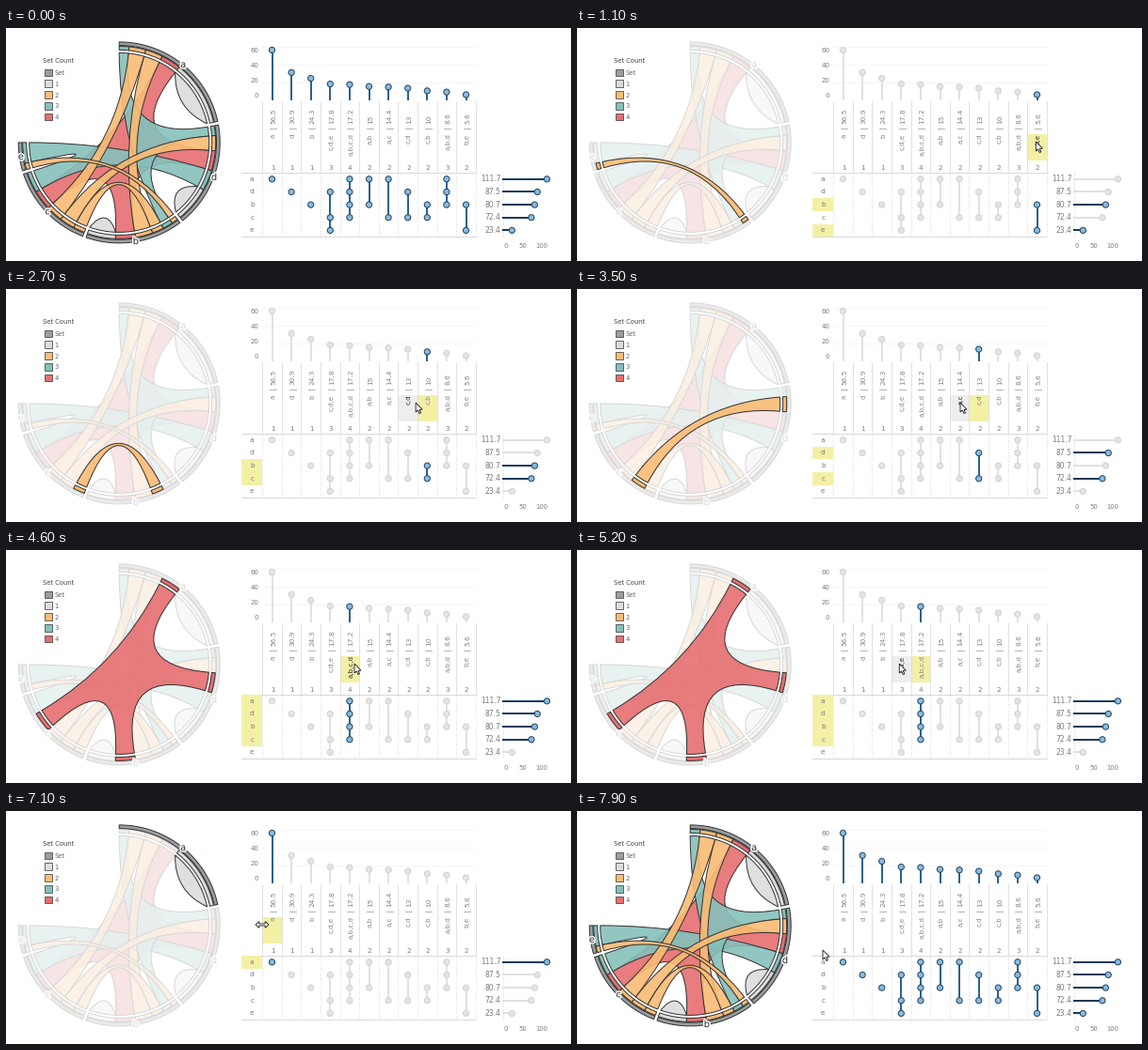
Animation, 600 px wide and 248 px high, one loop 8 s. Source, as a matplotlib script:

```python
import numpy as np
import matplotlib.pyplot as plt
import matplotlib.patheffects as fx
from matplotlib.animation import FuncAnimation
from matplotlib.colors import to_rgb
from matplotlib.patches import Circle, PathPatch, Polygon, Rectangle
from matplotlib.path import Path

W, H, DPI = 600, 248, 100
STEP, FRAMES = 100, 80
PX = 72 / DPI
LAG = 300  # delay between hovering a header and its highlight

COMBOS = {"a": 56.5, "d": 30.9, "b": 24.3, "cde": 17.8, "abcd": 17.2,
          "ab": 15, "ac": 14.4, "cd": 13, "cb": 10, "abd": 8.6, "be": 5.6}
KEYS = list(COMBOS)
SETS = "adbce"
TOTAL = {s: sum(v for k, v in COMBOS.items() if s in k) for s in SETS}

COUNT_COLOR = {1: "#dcdcdc", 2: "#fabc74", 3: "#86c0bb", 4: "#e66e70"}
SET_GRAY, INK = "#9a9da1", "#333333"
BLUE, NAVY, DOT, DOT_EDGE = "#2d628f", "#1d3a59", "#88bbdf", "#24435f"
YELLOW, HOVER = "#f3f0a6", "#eeeeee"
TEXT, HEAD, DARK = "#7a7a7a", "#858585", "#2a2a2a"

# Upset chart layout
X0, COL, ROW0, ROW = 272.2, 20.6, 160.8, 13.65
X1 = X0 + COL * len(KEYS)
LEFT, HEAD_Y, HEAD_H = 250.3, 112.7, 28
BASE, UNIT = 76.2, 0.933
BAR_X, BAR_UNIT = 527.5, 0.42

# Chord layout, angles clockwise from the top
CX, CY, GAP = 120.2, 121.9, 2.0
R_CHORD, R_COUNT, R_SET = 95.5, (98.5, 102.5), (103.3, 107.0)
DEG = (270 - GAP * 4) / sum(TOTAL.values())

fig = plt.figure(figsize=(W / DPI, H / DPI), dpi=DPI, facecolor="white")
ax = fig.add_axes([0, 0, 1, 1])
ax.set(xlim=(0, W), ylim=(H, 0))
ax.axis("off")

items = []  # (artist, test, style when on, style when off, base zorder)


def track(artist, test, on, off, z):
    items.append((artist, test, on, off, z))


def only(key):
    return lambda active: active == key


def member(letter):
    return lambda active: letter in active


def label(x, y, s, size, color=TEXT, ha="center", va="center", **kw):
    return ax.text(x, y, s, fontsize=size * PX, color=color, ha=ha, va=va,
                   family="DejaVu Sans", **kw)


def line(xs, ys, color="#d6d6d6", width=0.8, z=1, **kw):
    return ax.plot(xs, ys, color=color, lw=width * PX, zorder=z, **kw)[0]


def polar(r, deg):
    t = np.radians(deg)
    return np.column_stack([CX + r * np.sin(t), CY - r * np.cos(t)])


def arc(r, a, b):
    return polar(r, np.linspace(a, b, max(4, int(abs(b - a)) + 2)))


def faded(color):
    """Slightly greyed tint of a colour."""
    rgb = np.array(to_rgb(color))
    rgb = 0.8 * rgb + 0.2 * rgb.mean()
    return 1 - 0.23 * (1 - rgb)


def shape(patch, test, color, z, alpha=1.0):
    patch.set(linewidth=PX, joinstyle="round")
    ax.add_patch(patch)
    track(patch, test,
          dict(facecolor=(*to_rgb(color), alpha), edgecolor=INK),
          dict(facecolor=(*faded(color), 0.85), edgecolor="#d8d8d8"), z)


def band(radii, a, b, test, color):
    pts = np.vstack([arc(radii[0], a, b), arc(radii[1], b, a)])
    shape(Polygon(pts, closed=True), test, color, 7)


def ribbon(spans):
    """Join arcs of the inner circle by curves bent towards the centre."""
    verts, codes = [], []
    ctrl = (CX, CY)
    if len(spans) == 1:
        ctrl = tuple(polar(R_CHORD * 0.72, [np.mean(spans[0])])[0])
    for i, (a, b) in enumerate(spans):
        pts = arc(R_CHORD, a, b)
        verts += [tuple(p) for p in pts]
        codes += [Path.LINETO] * len(pts)
        nxt = spans[(i + 1) % len(spans)][0]
        verts += [ctrl, tuple(polar(R_CHORD, [nxt])[0])]
        codes += [Path.CURVE3] * 2
    codes[0] = Path.MOVETO
    return Path(verts, codes)


def draw_chords():
    spans = {k: [] for k in KEYS}
    start = 0
    halo = [fx.withStroke(linewidth=3 * PX, foreground="white")]
    for s in SETS:
        end = start + TOTAL[s] * DEG
        band(R_SET, start, end, only(s), SET_GRAY)
        at = start
        for k in sorted((k for k in KEYS if s in k), key=COMBOS.get):
            stop = at + COMBOS[k] * DEG
            spans[k].append((at, stop))
            band(R_COUNT, at, stop, only(k), COUNT_COLOR[len(k)])
            at = stop
        x, y = polar(106.5, [(start + end) / 2])[0]
        t = label(x + 1, y, s, 10, path_effects=halo)
        track(t, only(s), dict(color=DARK), dict(color="#d8d8d8"), 20)
        start = end + GAP
    for k in KEYS:
        n = len(k)
        shape(PathPatch(ribbon(spans[k])), only(k), COUNT_COLOR[n], 6 - n, 0.9)


def draw_legend():
    label(39, 35, "Set Count", 6.8, "#444444", "left")
    rows = [("Set", SET_GRAY)] + [(str(n), c) for n, c in COUNT_COLOR.items()]
    for i, (name, color) in enumerate(rows):
        y = 47.4 + 11.8 * i
        ax.add_patch(Rectangle((41, y - 3.8), 7.6, 7.6, fc=color, ec="#444444",
                               lw=0.8 * PX))
        label(51.5, y, name, 6.8, "#666666", "left", "center_baseline")


def stem(xs, ys, test, color, z=4):
    ln = line(xs, ys, color, 2)
    track(ln, test, dict(color=color), dict(color="#dfe1e3"), z)


def dot(x, y, test):
    c = ax.add_patch(Circle((x, y), 3.1, lw=PX))
    track(c, test, dict(facecolor=DOT, edgecolor=DOT_EDGE),
          dict(facecolor="#e4e4e4", edgecolor="#d2d2d2"), 5)


def row_y(s):
    return ROW0 + ROW * SETS.index(s)


def draw_grid():
    top, bottom = ROW0 - ROW / 2, ROW0 + ROW * 4.5
    for y in (top, bottom):
        line([LEFT, X1], [y, y], "#d0d0d0")
    for v in (20, 40, 60):
        y = BASE - UNIT * v
        line([X0, X1], [y, y], "#f4f4f4")
    for i in range(len(KEYS) + 1):
        x = X0 + COL * i
        line([x, x], [78, top], "#dadada")
        line([x, x], [top, bottom], "#dedede", ls=(0, (2, 2)))
    line([BAR_X, BAR_X], [top, bottom], "#e9e9e9")
    for v, y in ((60, 24), (40, 40), (20, 56.5), (0, 71.5)):
        label(268.5, y, str(v), 7, ha="right")
    for v, x in ((0, 530.5), (50, 549), (100, 569)):
        label(x, 231.5, str(v), 6.8)


def draw_upset():
    names = []
    for i, k in enumerate(KEYS):
        x = X0 + COL * (i + 0.5)
        y = BASE - UNIT * COMBOS[k]
        stem([x, x], [BASE, y], only(k), BLUE)
        dot(x, y, only(k))
        label(x + 1.5, 101.7, f"{COMBOS[k]:g}", 7.5, HEAD, va="bottom",
              rotation=90)
        line([x - 2.5, x + 4.5], [107.3, 107.3], "#a0a0a0", 0.8, 3)
        names.append(label(x + 1.3, 112.5, ",".join(k), 7.2, HEAD, va="top",
                           rotation=90))
        label(x + 0.5, 148.7, str(len(k)), 7.2)
        ys = [row_y(s) for s in k]
        if len(k) > 1:
            stem([x, x], [min(ys), max(ys)], only(k), BLUE)
        for yy in ys:
            dot(x, yy, only(k))
    for s in SETS:
        y = row_y(s)
        cell = ax.add_patch(Rectangle((LEFT, y - ROW / 2), X0 - LEFT, ROW,
                                      fc=YELLOW, lw=0))
        row_cells.append((s, cell))
        label(261.3, y, s, 7.4)
        end = BAR_X + BAR_UNIT * TOTAL[s]
        stem([BAR_X, end], [y, y], member(s), NAVY)
        dot(end, y, member(s))
        label(525.5, y, f"{TOTAL[s]:.1f}", 7.6, ha="right")
    return names


def header_cell(color):
    return ax.add_patch(Rectangle((0, HEAD_Y), COL, HEAD_H, fc=color, lw=0,
                                  zorder=0))


row_cells = []
draw_grid()
draw_legend()
draw_chords()
col_names = draw_upset()
hover_cell, active_cell = header_cell(HOVER), header_cell(YELLOW)

ARROW = np.array([(0, 0), (0, 10), (2.3, 7.9), (3.9, 11.5), (5.5, 10.8),
                  (4, 7.4), (7, 7.2)])
half = np.array([(-7, 0), (-3.2, -3.4), (-3.2, -1), (3.2, -1), (3.2, -3.4)])
RESIZE = np.vstack([half, -half])
cursor = ax.add_patch(Polygon(ARROW, closed=True, fc="white", ec="#222222",
                              lw=0.9 * PX, zorder=40))

PATH_T = [100, 700, 900, 1200, 1400, 1500, 1900, 2000, 2100, 2800, 3200, 3500,
          4300, 4600, 5900, 6800, 7000, 7100, 7300, 7400, 7500, 7600, 7900]
PATH_X = [610, 497, 490, 486, 486, 476, 468, 466, 466, 430, 424, 407,
          374, 370, 310, 276, 272, 272, 268, 268, 264, 264, 261]
PATH_Y = [133, 122] + [121] * 16 + [129, 129, 139, 139, 148]


def pointer(t):
    return np.interp(t, PATH_T, PATH_X), np.interp(t, PATH_T, PATH_Y)


def column_at(t):
    x, y = pointer(t)
    i = int(np.floor((x - X0) / COL))
    inside = 0 <= i < len(KEYS) and HEAD_Y <= y <= HEAD_Y + HEAD_H
    return i if inside else None


def place(cell, i):
    cell.set_visible(i is not None)
    if i is not None:
        cell.set_x(X0 + COL * i)


def update(frame):
    t = frame * STEP
    hovered, picked = column_at(t), column_at(t - LAG)
    active = "" if picked is None else KEYS[picked]
    for artist, test, on, off, z in items:
        lit = test(active)
        artist.set(**(on if lit or not active else off))
        artist.set_zorder(z + (10 if lit and active else 0))
    for s, cell in row_cells:
        cell.set_visible(s in active)
    place(hover_cell, hovered)
    place(active_cell, picked)
    for i, name in enumerate(col_names):
        name.set_color(DARK if i == hovered else HEAD)
    x, y = pointer(t)
    resize = abs(x - X0) < 1 and y < 125
    cursor.set_xy((RESIZE if resize else ARROW) + (x, y))
    return []


anim = FuncAnimation(fig, update, frames=FRAMES, interval=STEP, repeat=True,
                     repeat_delay=0)
plt.show()
```
